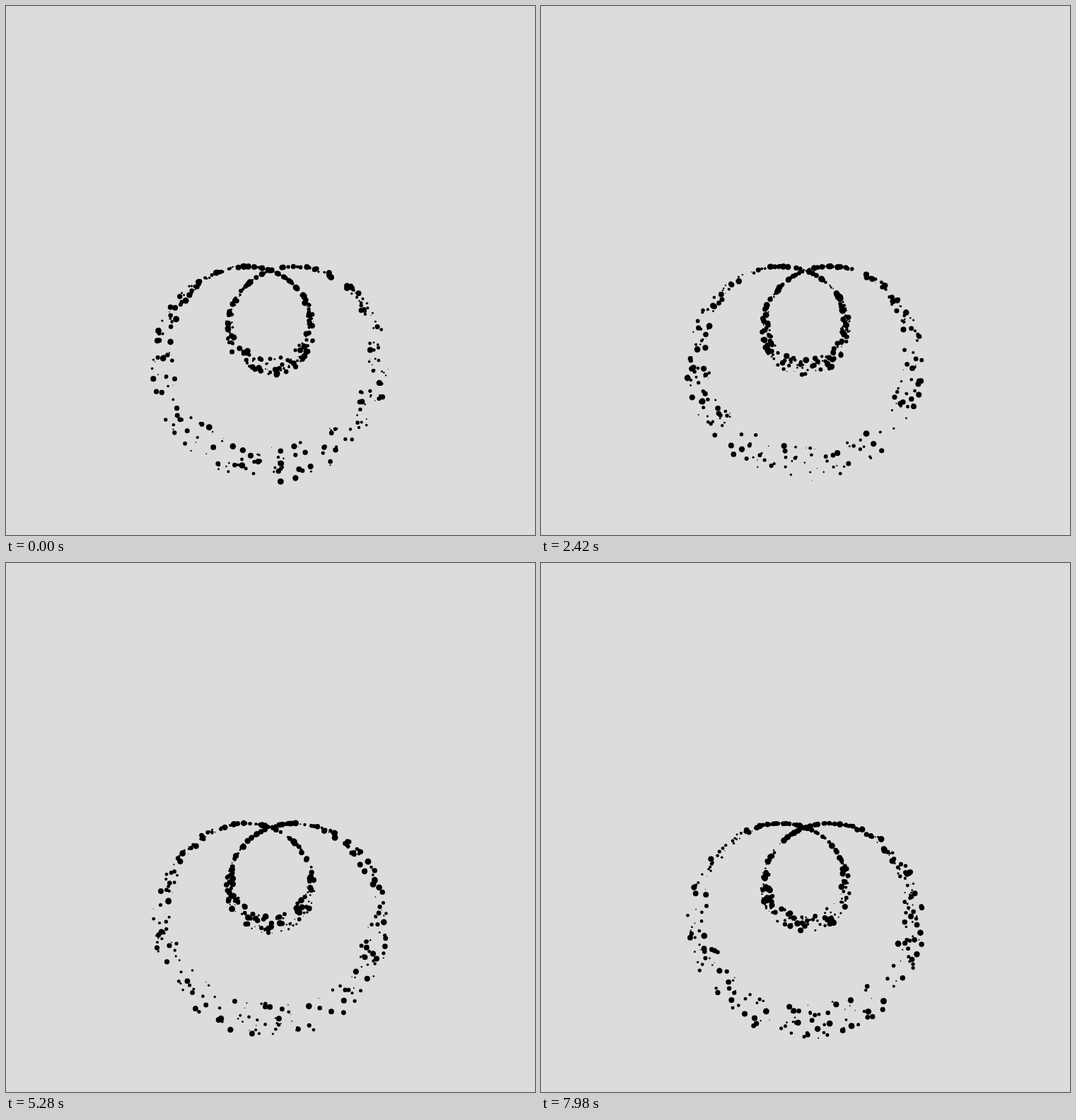
An HTML page with a canvas that plays this animation: 748x748 px, repeating every 8 s.

```html
<!DOCTYPE html>
<html lang="en">
<head>
<meta charset="utf-8">
<title>Orbiting dots</title>
<style>
  html, body { margin: 0; width: 100%; height: 100%; overflow: hidden; background: #dcdcdc; }
  canvas { display: block; width: 748px; height: 748px; }
</style>
</head>
<body>
<canvas id="stage" width="748" height="748"></canvas>
<script>
const SIZE = 748, MID = SIZE / 2, LOOP = 8000, STEP = 20, COUNT = 480;
const ctx = document.getElementById('stage').getContext('2d');

function seeded(seed) {
  return () => {
    seed = (seed + 0x6D2B79F5) | 0;
    let n = Math.imul(seed ^ (seed >>> 15), 1 | seed);
    n = (n + Math.imul(n ^ (n >>> 7), 61 | n)) ^ n;
    return ((n ^ (n >>> 14)) >>> 0) / 4294967296;
  };
}

const rand = seeded(29);
const between = (lo, hi) => lo + (hi - lo) * rand();

// angle in radians from straight down, speed in radians per second
const dots = Array.from({ length: COUNT }, () => ({
  angle: between(0, 2 * Math.PI),
  speed: between(0.2, 0.5),
  spread: between(1, 1.2),
  radius: between(0.5, 4.5)
}));

// Each dot follows its own scaled limaçon around the centre.
function draw(ms) {
  ctx.fillStyle = '#dcdcdc';
  ctx.fillRect(0, 0, SIZE, SIZE);
  ctx.fillStyle = '#000';
  for (const { angle, speed, spread, radius } of dots) {
    const a = angle + speed * ms / 1000;
    const r = SIZE / 4 * (1 / 3 + Math.cos(a)) * spread;
    ctx.beginPath();
    ctx.arc(MID - r * Math.sin(a), MID + r * Math.cos(a), radius, 0, 2 * Math.PI);
    ctx.fill();
  }
}

const start = performance.now();
function tick() {
  const ms = (performance.now() - start) % LOOP;
  draw(Math.floor(ms / STEP) * STEP);
  requestAnimationFrame(tick);
}
tick();
</script>
</body>
</html>
```
